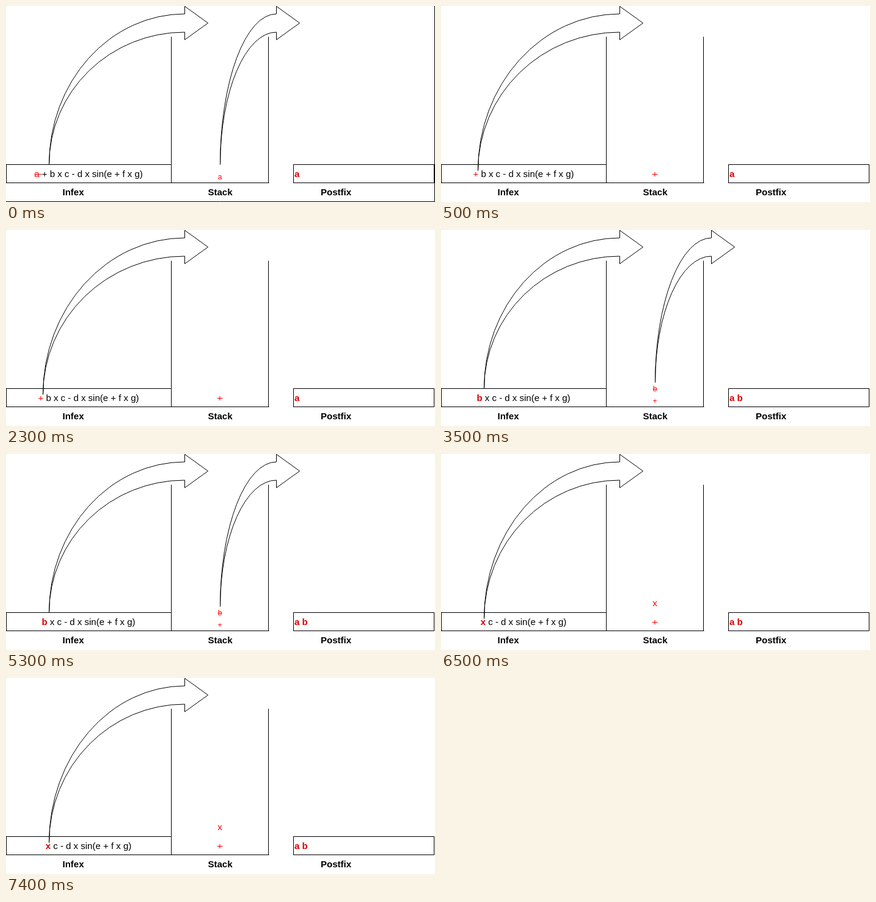
Write an HTML page with a canvas that moves like this. It is 702x322 px and loops after 8000 ms.

```html
<!DOCTYPE html>
<html lang="en">
<head>
<meta charset="utf-8">
<title>Infix to postfix</title>
<style>
  html, body { margin: 0; width: 100%; height: 100%; overflow: hidden; background: #fff; }
  canvas { display: block; }
</style>
</head>
<body>
<canvas id="stage" width="702" height="322"></canvas>
<script>
const ctx = document.getElementById('stage').getContext('2d');
const LOOP = 8000;
const RED = '#f00', DEEP_RED = '#de0000';

// Each step: infix = head symbol + rest, arrows = [left, right, bottom],
// stack = [text, baseline, size, style].
const steps = [
  { start: 0, head: ['a ', { strike: true }], rest: '+ b x c - d x sin(e + f x g)',
    arrows: [[70, 330, 260], [350, 480, 260]],
    stack: [['a', 285, 12, {}]], postfix: 'a', framed: true },
  { start: 500, head: ['+', {}], rest: ' b x c - d x sin(e + f x g)',
    arrows: [[60, 330, 270]],
    stack: [['+', 281, 15, { strike: true }]], postfix: 'a' },
  { start: 3500, head: ['b', { bold: true }], rest: ' x c - d x sin(e + f x g)',
    arrows: [[70, 330, 260], [350, 480, 250]],
    stack: [['b', 265, 12, { strike: true }], ['+', 285, 12, {}]], postfix: 'a b' },
  { start: 6500, head: ['x', { bold: true }], rest: ' c - d x sin(e + f x g)',
    arrows: [[70, 330, 270]],
    stack: [['x', 250, 15, {}], ['+', 281, 15, { strike: true }]], postfix: 'a b' }
];

function setFont(size, bold) {
  ctx.font = `${bold ? 'bold ' : ''}${size}px "Liberation Sans", Arial, sans-serif`;
}

function measure(text, size, bold) {
  setFont(size, bold);
  return ctx.measureText(text).width;
}

function write(text, x, y, { size = 15, color = '#000', bold = false, strike = false } = {}) {
  const width = measure(text, size, bold);
  ctx.fillStyle = color;
  ctx.fillText(text, x, y);
  if (strike) ctx.fillRect(x, y - Math.round(size / 3), width, 1);
  return width;
}

function writeCentered(text, cx, y, style) {
  write(text, cx - measure(text, style.size || 15, style.bold) / 2, y, style);
}

function line(...points) {
  ctx.beginPath();
  points.forEach(([x, y]) => ctx.lineTo(x + 0.5, y + 0.5));
  ctx.stroke();
}

function box(x, y, w, h) {
  ctx.strokeRect(x + 0.5, y + 0.5, w, h);
}

function arrow([left, right, bottom]) {
  const neck = right - 38, rx = neck - left;
  ctx.save();
  ctx.translate(0.5, 0.5);
  ctx.beginPath();
  ctx.moveTo(neck, 0);
  ctx.lineTo(right, 27.5);
  ctx.lineTo(neck, 55);
  ctx.lineTo(neck, 42.5);
  ctx.ellipse(neck, bottom, rx, bottom - 42.5, 0, -Math.PI / 2, Math.PI, true);
  ctx.ellipse(neck, bottom, rx, bottom - 12.5, 0, Math.PI, Math.PI * 1.5);
  ctx.closePath();
  ctx.fillStyle = '#fff';
  ctx.fill();
  ctx.stroke();
  ctx.restore();
}

function writeInfix([head, style], rest) {
  const total = measure(head, 15, style.bold) + measure(rest, 15);
  const x = 135 - total / 2;
  const color = style.bold ? DEEP_RED : RED;
  const used = write(head, x, 281, { ...style, color });
  write(rest, x + used, 281);
}

function draw(step) {
  ctx.fillStyle = '#fff';
  ctx.fillRect(0, 0, 702, 322);
  ctx.strokeStyle = '#000';
  ctx.lineWidth = 1;

  box(0, 260, 270, 30);
  box(470, 260, 230, 30);
  line([270, 50], [270, 290], [430, 290]);
  line([429, 50], [429, 290]);
  step.arrows.forEach(arrow);

  writeInfix(step.head, step.rest);
  for (const [text, y, size, style] of step.stack) {
    writeCentered(text, 350, y, { ...style, size, color: RED });
  }
  write(step.postfix, 472, 281, { bold: true, color: DEEP_RED });
  writeCentered('Infex', 110, 311, { bold: true });
  writeCentered('Stack', 350.5, 311, { bold: true });
  writeCentered('Postfix', 540, 311, { bold: true });

  if (step.framed) line([701, -1], [701, 321], [-1, 321]);
}

let shown = null;
function tick() {
  const time = performance.now() % LOOP;
  const step = steps.findLast(s => s.start <= time);
  if (step !== shown) draw(shown = step);
  requestAnimationFrame(tick);
}
tick();
</script>
</body>
</html>
```
